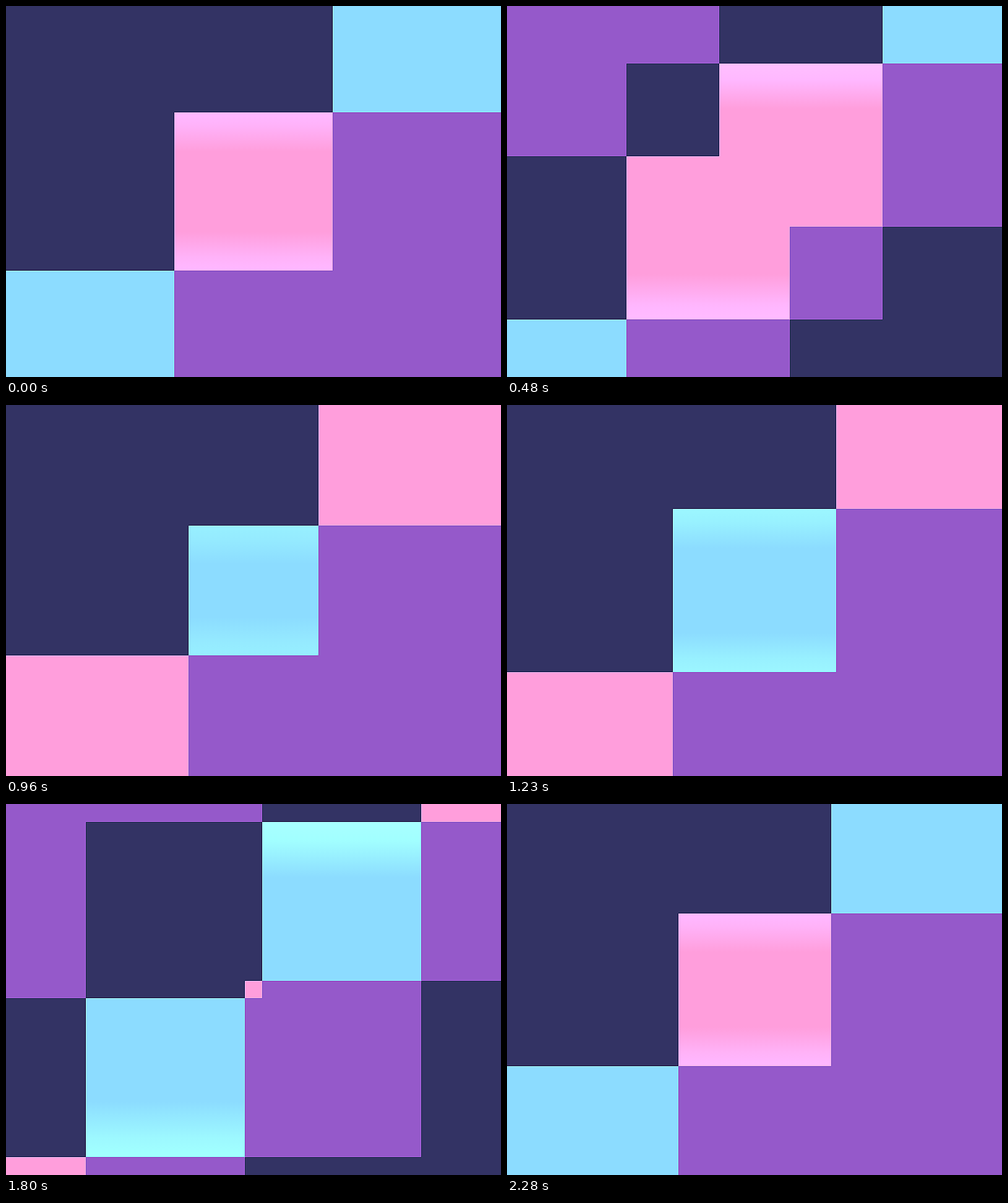
An HTML page with a canvas that plays this animation: 800x600 px, repeating every 2.31 s.

```html
<!DOCTYPE html>
<html>
<head>
<meta charset="utf-8">
<style>
html, body { margin: 0; width: 100%; height: 100%; overflow: hidden; }
canvas { display: block; }
</style>
</head>
<body>
<canvas id="stage" width="800" height="600"></canvas>
<script>
const W = 800, H = 600, LOOP = 2310, STEP = 30, PERIOD = 1170;
const NAVY = [51, 51, 100], PURPLE = [149, 89, 202];
const ACCENTS = [[255, 158, 220], [140, 220, 255]];
const ctx = document.getElementById('stage').getContext('2d');

// Corner distance from the centre over the life of one generation: [ms, px]
const KEYS = [
  [-1170, -455], [-1110, -396], [-930, -225], [-750, -92], [-690, -57],
  [-540, 14], [-420, 56], [-60, 123.5], [0, 128], [60, 132], [420, 189],
  [480, 207], [630, 271], [750, 342], [930, 497], [1170, 760]
];
const slopes = KEYS.slice(1).map(([t, v], i) => (v - KEYS[i][1]) / (t - KEYS[i][0]));
const tangents = KEYS.map(([t], i) => {
  if (i === 0) return slopes[0];
  if (i === slopes.length) return slopes[i - 1];
  const before = t - KEYS[i - 1][0], after = KEYS[i + 1][0] - t;
  return (slopes[i - 1] * after + slopes[i] * before) / (before + after);
});

function corner(time) {
  let i = 0;
  while (i < KEYS.length - 2 && time > KEYS[i + 1][0]) i++;
  const [t0, v0] = KEYS[i], [t1, v1] = KEYS[i + 1];
  const h = t1 - t0, s = (time - t0) / h, r = 1 - s;
  return r * r * (1 + 2 * s) * v0 + s * s * (3 - 2 * s) * v1
    + h * s * r * (r * tangents[i] - s * tangents[i + 1]);
}

const clamp = (v, lo, hi) => Math.max(lo, Math.min(hi, v));
const rgb = c => `rgb(${c.map(v => Math.round(clamp(v, 0, 255)))})`;

function box(color, x, y, w, h) {
  ctx.fillStyle = rgb(color);
  ctx.fillRect(x, y, w, h);
}

// Each generation is a top-left and a bottom-right quadrant that overlap once past the centre
function colorAt(x, y, outer, inner, outerColor, innerColor) {
  const topLeft = c => x < c && y < c;
  const bottomRight = c => x > -c && y > -c;
  const a = topLeft(outer), b = bottomRight(outer);
  const c = topLeft(inner), d = bottomRight(inner);
  if (a && b) return c && d ? innerColor : c ? NAVY : d ? PURPLE : outerColor;
  if (a) return c ? PURPLE : NAVY;
  if (b) return d ? NAVY : PURPLE;
  return innerColor;
}

// Soft light along the top edge and, mirrored, along the bottom edge
function glow(size, left) {
  const strength = clamp((size - 60) / 60, 0, 1);
  if (!strength) return;
  const growth = Math.min(1, (size / 342) ** 3);
  const depth = 60 + 60 * growth;
  ctx.save();
  ctx.globalCompositeOperation = 'lighter';
  ctx.translate(W / 2, H / 2);
  for (const [turn, gain] of [[1, 42], [-1, 24]]) {
    ctx.save();
    ctx.scale(turn, turn);
    const light = (25 + gain * growth) * strength;
    const fade = ctx.createLinearGradient(0, -size, 0, depth - size);
    fade.addColorStop(0, rgb([light * .6, light, light * 1.4]));
    fade.addColorStop(.35, rgb([light * .45, light * .75, light * 1.05]));
    fade.addColorStop(1, '#000');
    ctx.fillStyle = fade;
    const x = Math.round(left), y = Math.round(-size);
    ctx.fillRect(x, y, Math.round(size) - x, depth);
    ctx.restore();
  }
  ctx.restore();
}

const sharpen = (own, other) => own.map((v, i) => v + .36 * (v - other[i]));

function render(time) {
  const turn = Math.floor(time / PERIOD), phase = time - turn * PERIOD;
  const outer = corner(phase), inner = corner(phase - PERIOD);
  const lines = extent => [...new Set([0, extent, ...[outer, -outer, inner, -inner]
    .map(v => clamp(Math.round(extent / 2 + v), 0, extent))])].sort((a, b) => a - b);
  const xs = lines(W), ys = lines(H);
  const cells = ys.slice(1).map((y, j) => xs.slice(1).map((x, i) =>
    colorAt((x + xs[i] - W) / 2, (y + ys[j] - H) / 2, outer, inner,
      ACCENTS[turn % 2], ACCENTS[(turn + 1) % 2])));
  const eachCell = draw => cells.forEach((row, j) => row.forEach((color, i) =>
    draw(color, i, j, xs[i], ys[j], xs[i + 1] - xs[i], ys[j + 1] - ys[j])));

  eachCell((color, i, j, x, y, w, h) => box(color, x, y, w, h));
  glow(outer, Math.max(inner, -outer));
  if (inner > 0) glow(inner, -inner);

  // One-pixel contrast lines on both sides of every colour border
  eachCell((color, i, j, x, y, w, h) => {
    const left = cells[j][i - 1], above = j && cells[j - 1][i];
    if (left && left !== color) {
      box(sharpen(left, color), x - 1, y, 1, h);
      box(sharpen(color, left), x, y, 1, h);
    }
    if (above && above !== color) {
      box(sharpen(above, color), x, y - 1, w, 1);
      box(sharpen(color, above), x, y, w, 1);
    }
  });
}

const start = performance.now();
function tick() {
  const time = (performance.now() - start) % LOOP;
  render(Math.floor(time / STEP) * STEP);
  requestAnimationFrame(tick);
}
tick();
</script>
</body>
</html>
```
